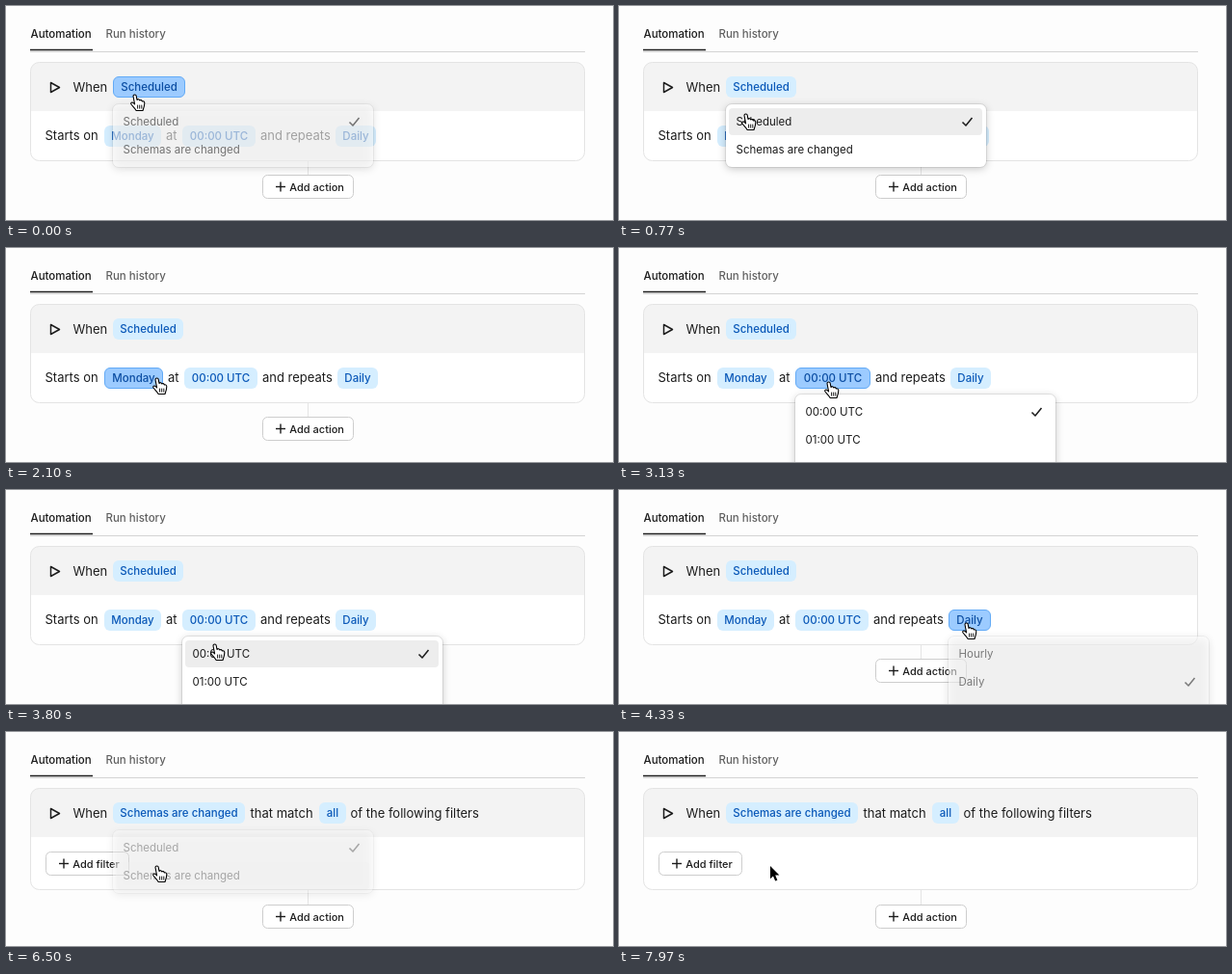
An HTML page with a canvas for the animation above (8000 ms loop, 630x222 px).

```html
<!DOCTYPE html>
<html lang="en">
<head>
<meta charset="utf-8">
<title>Automation trigger</title>
<style>
  html, body { margin: 0; width: 100%; height: 100%; overflow: hidden; background: #fdfdfd; }
  canvas { display: block; width: 630px; height: 222px; }
</style>
</head>
<body>
<canvas id="stage"></canvas>
<script>
const WIDTH = 630, HEIGHT = 222, LOOP = 8000, SWITCH_TIME = 6430;
const INK = '#1c1c1c';
const canvas = document.getElementById('stage');
const ctx = canvas.getContext('2d');
const ratio = window.devicePixelRatio || 1;
canvas.width = WIDTH * ratio;
canvas.height = HEIGHT * ratio;

// Pointer stops: time, x, y
const pointerStops = [
  [0, 134, 92], [250, 134, 92], [620, 132, 112], [1450, 132, 112],
  [2050, 157, 135], [2600, 157, 135], [2880, 218, 139], [3330, 218, 139],
  [3680, 217, 160], [3800, 217, 160], [4230, 361, 138], [5060, 361, 138],
  [5500, 169, 77], [5780, 169, 77], [6200, 157, 139], [LOOP, 157, 139]
];

// Each "shown" span is [start of fade in, start of fade out]
const menus = [
  { x: 111, y: 102, height: 65, items: ['Scheduled', 'Schemas are changed'], checked: 0,
    shown: [[-85, 880], [5558, SWITCH_TIME]] },
  { x: 102, y: 152, height: 210, items: ['Monday', 'Tuesday'], checked: 0, shown: [[2370, 2580]] },
  { x: 183, y: 152, height: 210, items: ['00:00 UTC', '01:00 UTC'], checked: 0, shown: [[2920, 4135]] },
  { x: 342, y: 152, height: 210, items: ['Hourly', 'Daily'], checked: 1, shown: [[4250, 4960]] }
];

const handShape = new Path2D('M-2 1.5C-2-.4 1-.6 1.2 1.3L2 5.5C2.6 4.2 4.4 4.5 4.7 6C5.6 5.1 7.1 5.6 7.3 7' +
  'C8.6 6.4 9.8 7.2 9.8 8.8C9.8 11.5 9.4 13 8 16.5H1.2C-.2 14-2.3 12.2-4 10C-5 8.5-3.2 7.4-1.7 8.6L-.4 9.8Z');
const knuckles = new Path2D('M2.6 11v3.2M4.7 11v3.2M6.8 11v3.2');
const arrowShape = new Path2D('M0 0V13.2L3 10.4L5.2 15.6L7.4 14.7L5.2 9.6H9.4Z');

const clamp = v => Math.min(1, Math.max(0, v));
const smooth = v => v * v * (3 - 2 * v);
const inside = (p, x, y, w, h) => p.x >= x && p.x <= x + w && p.y >= y && p.y <= y + h;

function pointerAt(t) {
  const i = pointerStops.findIndex(stop => stop[0] > t);
  const [t0, x0, y0] = pointerStops[i - 1], [t1, x1, y1] = pointerStops[i];
  const k = smooth((t - t0) / (t1 - t0));
  return { x: x0 + (x1 - x0) * k, y: y0 + (y1 - y0) * k };
}

function menuOpacity(menu, t) {
  return Math.max(...menu.shown.map(([start, end]) =>
    Math.min(clamp((t - start) / 145), 1 - clamp((t - end) / 110))));
}

function text(str, x, y, size = 13, weight = 400, color = INK, align = 'left') {
  ctx.font = `${weight} ${size}px Inter, sans-serif`;
  ctx.fillStyle = color;
  ctx.textAlign = align;
  ctx.fillText(str, x, y);
}

function box(x, y, w, h, r, fill, stroke) {
  ctx.beginPath();
  ctx.roundRect(x, y, w, h, r);
  if (fill) { ctx.fillStyle = fill; ctx.fill(); }
  if (stroke) { ctx.strokeStyle = stroke; ctx.lineWidth = 1; ctx.stroke(); }
}

function line(color, width, ...points) {
  ctx.beginPath();
  points.forEach(([x, y]) => ctx.lineTo(x, y));
  ctx.strokeStyle = color;
  ctx.lineWidth = width;
  ctx.stroke();
}

function button(label, x, y, w, plusX) {
  box(x + .5, y + .5, w, 24, 5, '#fff', '#cdcdcd');
  line(INK, 1.4, [plusX - 5, y + 12.5], [plusX + 5, y + 12.5]);
  line(INK, 1.4, [plusX, y + 7.5], [plusX, y + 17.5]);
  text(label, plusX + 9.3, y + 16.5, 11, 500);
}

// Draws a chip, which grows by its border while hovered, and returns its right edge.
function chip(label, x, y, w, pointer) {
  const hovered = pointer && inside(pointer, x, y, w, 22);
  if (hovered) {
    w += 2;
    pointer.onChip = true;
    box(x + .5, y + .5, w - 1, 21, 5.5, '#9ccbff', '#62aaf6');
  } else {
    box(x, y, w, 22, 6, '#d5eeff');
  }
  text(label, x + w / 2, y + 15, 11.5, 500, hovered ? '#0b4da2' : '#0a58b8', 'center');
  return x + w;
}

function drawPage(changed, pointer) {
  ctx.fillStyle = '#fdfdfd';
  ctx.fillRect(0, 0, WIDTH, HEIGHT);
  text('Automation', 25.5, 33, 11.5, 500);
  text('Run history', 103.5, 33, 11.5, 500, '#606060');
  line('#d4d4d4', 1, [25, 47.5], [601, 47.5]);
  line(INK, 1.5, [25, 45.5], [90, 45.5]);

  const bottom = changed ? 163.5 : 160.5;
  box(25.5, 58.5, 575, bottom - 58.5, 9, '#fff');
  box(25.5, 58.5, 575, 50.5, [9, 9, 0, 0], '#f3f3f3');
  box(25.5, 58.5, 575, bottom - 58.5, 9, null, '#e4e4e4');
  const actionY = changed ? 179 : 175;
  line('#e4e4e4', 1, [313.5, bottom], [313.5, actionY]);
  button('Add action', 266, actionY, 94, 285);

  ctx.lineJoin = 'round';
  line(INK, 1.5, [46.5, 79.5], [55.5, 84.5], [46.5, 89.5], [46.5, 79.5], [55.5, 84.5]);
  text('When', 69.5, 89);
  if (changed) {
    chip('Schemas are changed', 111, 73, 137, pointer);
    text('that match', 253.5, 89);
    chip('all', 325, 73, 28, pointer);
    text('of the following filters', 357.5, 89);
    button('Add filter', 41, 124, 86, 60);
  } else {
    chip('Scheduled', 111, 73, 73, pointer);
    text('Starts on', 40.5, 139);
    let x = chip('Monday', 102, 124, 59, pointer);
    text('at', x + 5, 139);
    x = chip('00:00 UTC', x + 22, 124, 76, pointer);
    text('and repeats', x + 5, 139);
    chip('Daily', x + 83, 124, 42, pointer);
  }
}

function drawMenu({ x, y, height, items, checked }, opacity, pointer) {
  ctx.save();
  ctx.globalAlpha = opacity;
  ctx.shadowColor = 'rgba(0,0,0,.22)';
  ctx.shadowBlur = 9 * ratio;
  ctx.shadowOffsetY = 2 * ratio;
  box(x, y, 270, height, 6, '#fff');
  ctx.shadowColor = 'transparent';
  box(x - .5, y - .5, 271, height + 1, 6.5, null, 'rgba(0,0,0,.08)');
  items.forEach((item, i) => {
    const middle = y + 18 + i * 29;
    if (inside(pointer, x, middle - 14.5, 270, 28.9)) box(x + 3, middle - 14, 263, 28, 4, '#ededed');
    text(item, x + 10.5, middle + 4, 11.5);
    if (i === checked) {
      line(INK, 1.5, [x + 245.5, middle + .5], [x + 249, middle + 4], [x + 255.5, middle - 4]);
    }
  });
  ctx.restore();
}

function drawPointer({ x, y }, isHand) {
  ctx.save();
  ctx.translate(x, y);
  ctx.lineJoin = ctx.lineCap = 'round';
  if (isHand) {
    ctx.fillStyle = '#fff';
    ctx.strokeStyle = '#000';
    ctx.lineWidth = 1.1;
    ctx.fill(handShape);
    ctx.stroke(handShape);
    ctx.lineWidth = .9;
    ctx.stroke(knuckles);
  } else {
    ctx.strokeStyle = '#fff';
    ctx.lineWidth = 2;
    ctx.stroke(arrowShape);
    ctx.fillStyle = '#000';
    ctx.fill(arrowShape);
  }
  ctx.restore();
}

function draw(t) {
  ctx.setTransform(ratio, 0, 0, ratio, 0, 0);
  const pointer = pointerAt(t);
  const open = menus.map(menu => [menu, menuOpacity(menu, t)]).filter(([, opacity]) => opacity > 0);
  const onMenu = open.some(([m]) => inside(pointer, m.x, m.y, 270, m.height));
  drawPage(t >= SWITCH_TIME, onMenu ? null : pointer);
  open.forEach(([menu, opacity]) => drawMenu(menu, opacity, pointer));
  drawPointer(pointer, onMenu || pointer.onChip);
}

function tick() {
  draw(performance.now() % LOOP);
  requestAnimationFrame(tick);
}
tick();
</script>
</body>
</html>
```
